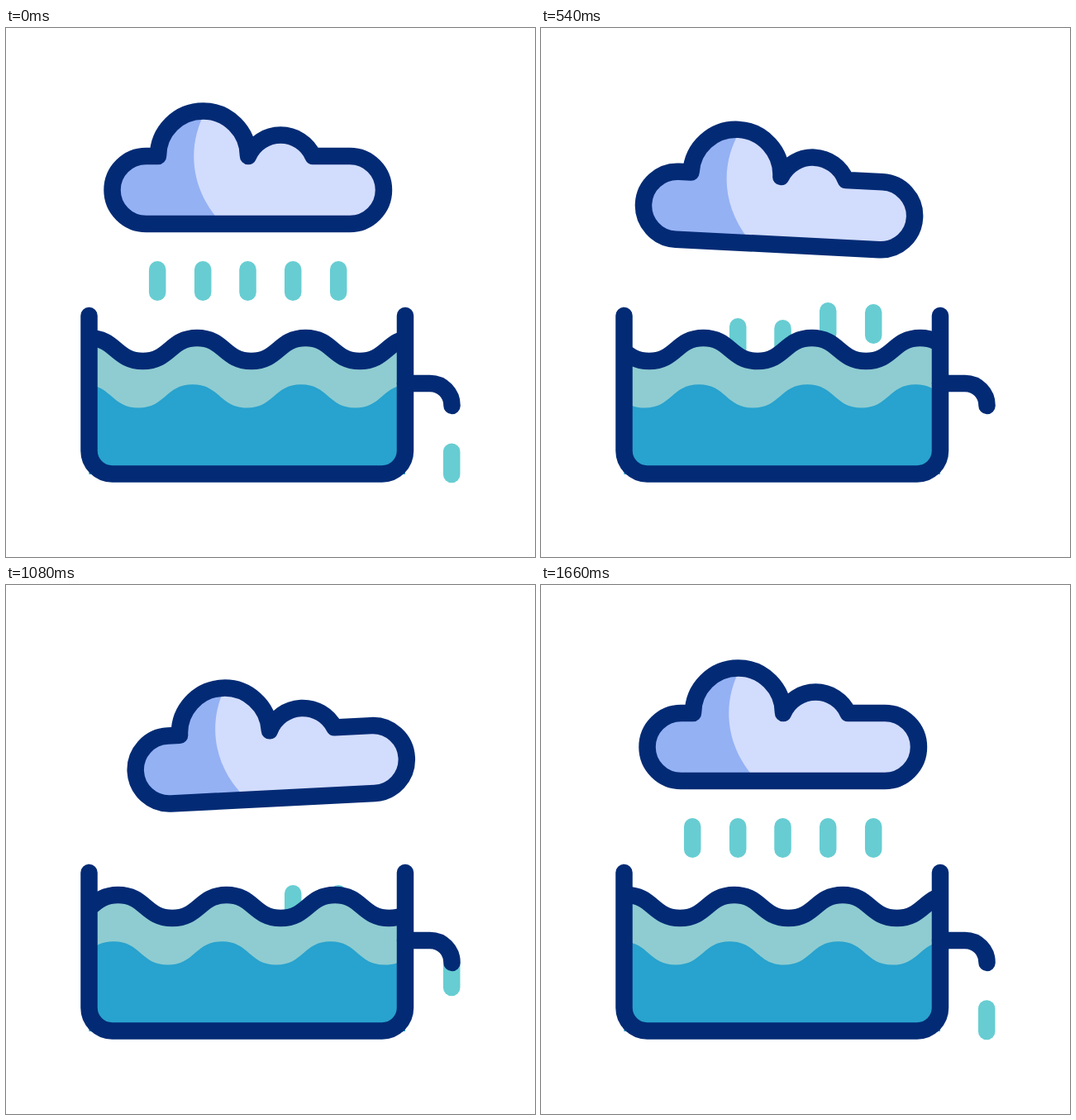
An HTML page for the animation above (2.4 s loop, 640 by 640 pixels).

```html
<!DOCTYPE html>
<html lang="en">
<head>
<meta charset="utf-8">
<title>Rainwater tank</title>
<style>
  html, body { margin: 0; width: 100%; height: 100%; overflow: hidden; background: #fff; }
  svg { display: block; width: 100%; height: 100%; }
  .line { fill: none; stroke: #032b75; stroke-width: 20.5; stroke-linecap: round; stroke-linejoin: round; }
  .drop { fill: none; stroke: #67cdd2; stroke-width: 20.5; stroke-linecap: round; }
</style>
</head>
<body>
<svg viewBox="0 0 640 640">
  <defs>
    <clipPath id="tankClip"><rect x="100.5" y="340" width="382.5" height="200"/></clipPath>
    <path id="cloudShape" d="M169.500 155H184A54.500 54.500 0 0 1 293 155A43 43 0 0 1 371.500 155H416A41 41 0 0 1 416 237H169.500A41 41 0 0 1 169.500 155Z"/>
    <clipPath id="cloudClip"><use href="#cloudShape"/></clipPath>
  </defs>

  <path id="rain" class="drop"/>
  <path id="drip" class="drop"/>

  <g clip-path="url(#tankClip)">
    <path id="surface" fill="#8eccd1"/>
    <path id="depth" fill="#28a2ce"/>
    <path id="crest" class="line"/>
  </g>
  <path class="line" d="M100.500 348V511.500A28 28 0 0 0 128.500 539.500H455A28 28 0 0 0 483 511.500V348"/>
  <path class="line" d="M483 430H513A26.500 26.500 0 0 1 539.500 457"/>

  <g id="cloud">
    <use href="#cloudShape" fill="#d2dcfd"/>
    <path clip-path="url(#cloudClip)" fill="#94b1f4" d="M242 100C219 140 221 195 262 237V250H110V90H242Z"/>
    <use href="#cloudShape" class="line"/>
  </g>
</svg>
<script>
const LOOP = 2400, MOVING = 1660, STEP = 20;
const WAVE = 131.2, DROP = 48, CAP = 10.25;
const el = id => document.getElementById(id);
const clamp = (v, lo, hi) => Math.min(hi, Math.max(lo, v));

// Smooth curve through [time, value] points with given end speeds.
function spline(points, startSpeed, endSpeed) {
  const last = points.length - 1;
  const speed = i => i === 0 ? startSpeed : i === last ? endSpeed
    : (points[i + 1][1] - points[i - 1][1]) / (points[i + 1][0] - points[i - 1][0]);
  return t => {
    if (t >= points[last][0]) return points[last][1];
    const i = points.findIndex((p, k) => t < points[k + 1][0]);
    const [t0, a] = points[i], [t1, b] = points[i + 1];
    const d = t1 - t0, s = (t - t0) / d, s2 = s * s, s3 = s2 * s;
    return a * (2 * s3 - 3 * s2 + 1) + b * (3 * s2 - 2 * s3)
      + d * (speed(i) * (s3 - 2 * s2 + s) + speed(i + 1) * (s3 - s2));
  };
}

const cloudX = spline([[0, 0], [220, -7.7], [540, -4.7], [720, 6.4], [1080, 28], [1380, 18.4], [1660, 0]], -0.03, -0.05);
const cloudY = spline([[0, 0], [220, 9.3], [540, 25], [720, 28.7], [1080, 21.3], [1380, 4], [1660, 0]], 0.03, -0.01);
const cloudTurn = spline([[0, 0], [220, 2.08], [540, 2.9], [720, 0.6], [1080, -2.9], [1380, -1.15], [1660, 0]], 0.008, 0.004);
const waveShift = spline([[0, 0], [220, -51], [540, -166], [720, -233], [1080, -358], [1380, -391]], -0.12, 0);

// slide: fall of the first drop by 220 ms; second, third: lower edge at two times;
// left: distance still to fall at 1380 ms.
const drops = [
  { x: 183.2, slide: 84, second: [258, 416], third: [276, 442], left: 17 },
  { x: 238.2, slide: 76, second: [252, 399], third: [272, 425], left: 28 },
  { x: 292.5, slide: 71, second: [259, 401], third: [272, 425], left: 31 },
  { x: 347.2, slide: 66, second: [255, 380], third: [270, 411], left: 36 },
  { x: 402.2, slide: 60, second: [267, 382], third: [280, 411], left: 36 }
];

// Rounded stroke whose outer ends touch top and bottom.
function capsule(x, top, bottom) {
  const start = top + CAP, end = Math.max(start + 0.01, bottom - CAP);
  return `M${x} ${start}V${end}`;
}

function falling(x, t, t0, t1, [b0, b1]) {
  const bottom = clamp(b0 + (b1 - b0) * (t - t0) / (t1 - t0), 240, 460);
  return capsule(x, bottom - DROP, bottom);
}

function rainPath(t) {
  return drops.map(({ x, slide, second, third, left }) => {
    const fall = Math.min(130, slide * (t / 220) ** 1.3);
    let d = capsule(x, 282 + fall, 330 + fall * 0.69);
    d += falling(x, t, 220, 540, second);
    d += falling(x, t, 720, 1080, third);
    if (t > 1080) {
      const rate = 0.000625, end = 1380 + Math.sqrt(left / rate);
      const bottom = Math.max(240, 330 - rate * Math.max(0, end - t) ** 2);
      d += capsule(x, bottom - DROP, bottom);
    }
    return d;
  }).join("");
}

function dripPath(t) {
  const x = 539.2;
  if (t < 180) {
    const u = (t / 180) ** 1.5;
    return capsule(x, 502.5 + 80 * u, 550.3 + 53 * u);
  }
  if (t > 545 && t < 810) {
    const bottom = 565 + 0.55 * (t - 720);
    return capsule(x, Math.max(448, bottom - DROP, 529 + 0.74 * (t - 720)), bottom);
  }
  if (t > 990) {
    const bottom = 550.3 - 0.00042 * Math.max(0, 1435 - t) ** 2;
    return capsule(x, Math.max(448, bottom - DROP), bottom);
  }
  return "";
}

function wavePath(crestX, high, low) {
  const half = WAVE / 2, h = low - high;
  let x = crestX - WAVE * Math.ceil((crestX - 60) / WAVE);
  let d = `M${x} ${high}`;
  for (; x < 540; x += WAVE) {
    d += `c${half / 2} 0 ${half / 2} ${h} ${half} ${h}`;
    d += `c${half / 2} 0 ${half / 2} ${-h} ${half} ${-h}`;
  }
  return d;
}

function draw(t) {
  el("cloud").setAttribute("transform",
    `translate(${cloudX(t)} ${cloudY(t)}) rotate(${cloudTurn(t)} 292.7 196)`);
  el("rain").setAttribute("d", rainPath(t));
  el("drip").setAttribute("d", dripPath(t));

  const shift = waveShift(t);
  const top = wavePath(231.2 + shift, 375, 403);
  el("crest").setAttribute("d", top);
  el("surface").setAttribute("d", top + "V540H0V375Z");
  el("depth").setAttribute("d", wavePath(225.8 + shift, 431.3, 459.6) + "V540H0V431Z");
}

const began = performance.now();
function tick() {
  const time = (performance.now() - began) % LOOP;
  draw(Math.min(MOVING, Math.floor(time / STEP) * STEP));
  requestAnimationFrame(tick);
}
draw(0);
requestAnimationFrame(tick);
</script>
</body>
</html>
```
